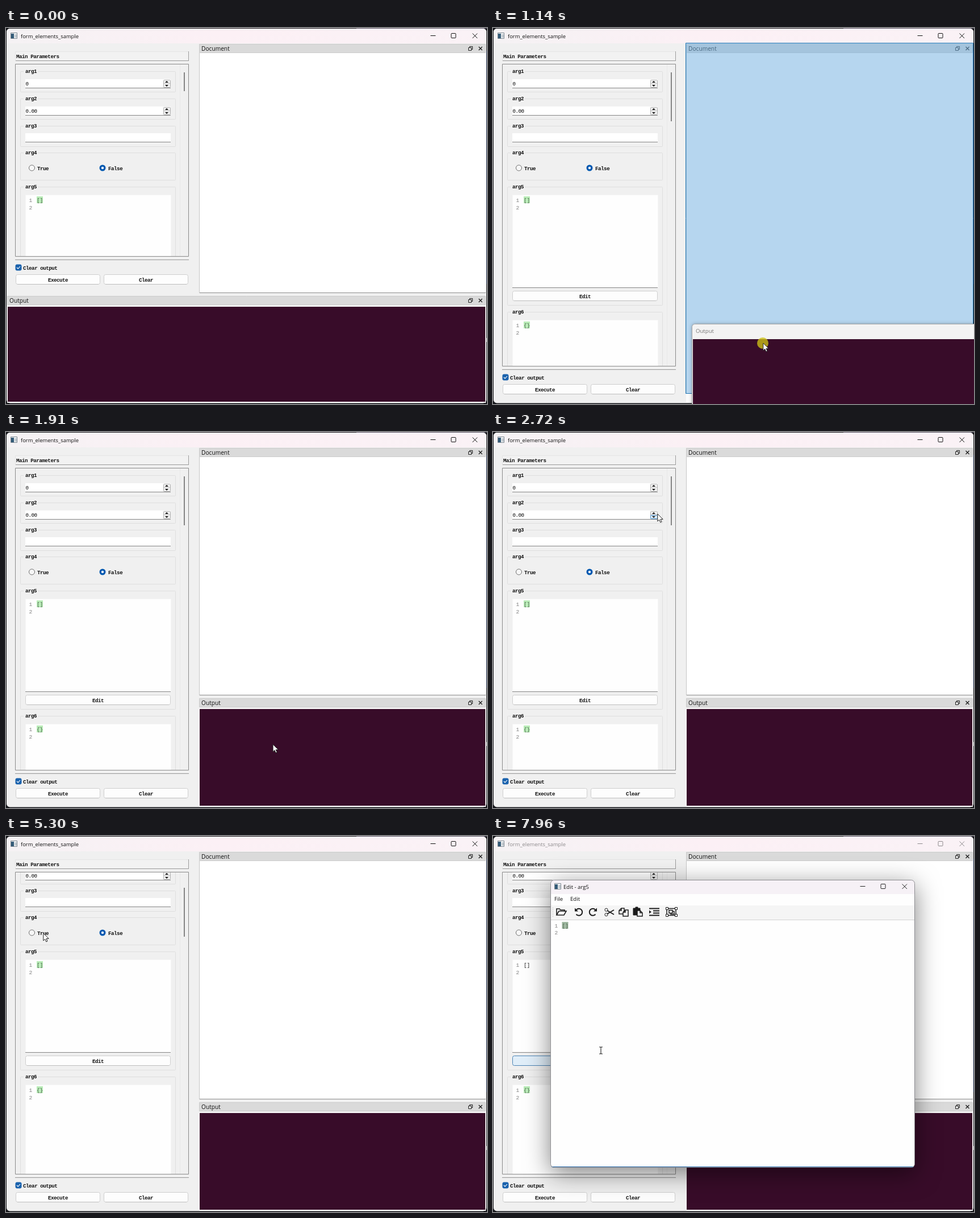
Write an HTML page with a canvas that moves like this. It is 847 px wide and 661 px high and loops after 8000 ms.

```html
<!DOCTYPE html>
<html lang="en">
<head>
<meta charset="utf-8">
<title>Form window</title>
<style>
html, body { margin: 0; height: 100%; overflow: hidden; background: #15161a; }
canvas { display: block; }
</style>
</head>
<body>
<canvas id="stage" width="847" height="661"></canvas>
<script>
const c = document.getElementById('stage').getContext('2d');
const UI = '"Open Sans", "Noto Sans", sans-serif';
const MONO = '"Liberation Mono", "DejaVu Sans Mono", monospace';
const GREY = '#f0f0f0', DARK = '#380c29', LINE = '#8a8a8a', BLUE = '#1a62ad', FOCUS = '#0067c0';
const MARK = '#b9ecb7';
const LOOP = 8000;

// Pointer stops: time, x, y
const path = [
  [70, -8, 560], [360, 127, 480], [480, 127, 480], [860, 335, 492], [1140, 475, 554],
  [1420, 495, 583], [1630, 484, 581], [1790, 484, 581], [2520, 283, 147], [2590, 283, 147],
  [2720, 289, 144], [2780, 289, 144], [2930, 313, 135], [3140, 313, 135], [3380, 301, 118],
  [3610, 313, 93], [3850, 313, 93], [4150, 313, 106], [4450, 313, 106], [5230, 66, 168],
  [5300, 65, 171], [5600, 65, 171], [6100, 62, 231], [6620, 62, 231], [6790, 87, 376],
  [6850, 87, 376], [7210, 165, 394], [7410, 165, 394], [7900, 190, 377]
];

const clamp = v => Math.max(0, Math.min(1, v));
const ease = (t, a, b) => { const p = clamp((t - a) / (b - a)); return p * p * (3 - 2 * p); };
const mix = (a, b, p) => a + (b - a) * p;
const within = (t, a, b) => t >= a && t < b;

function pointer(t) {
  let i = path.findIndex(k => k[0] > t);
  if (i < 0) i = path.length - 1;
  if (i === 0) return null;
  const a = path[i - 1], b = path[i], p = ease(t, a[0], b[0]);
  return { x: mix(a[1], b[1], p), y: mix(a[2], b[2], p) };
}

function fill(x, y, w, h, color) { c.fillStyle = color; c.fillRect(x, y, w, h); }

function box(x, y, w, h, color, edge, r = 0) {
  c.beginPath();
  c.roundRect(x + .5, y + .5, w - 1, h - 1, r);
  if (color) { c.fillStyle = color; c.fill(); }
  if (edge) { c.strokeStyle = edge; c.lineWidth = 1; c.stroke(); }
}

function text(s, x, y, color = '#111', font = '9.6px ' + UI, gap = 0, align = 'left') {
  c.font = font;
  c.letterSpacing = gap + 'px';
  c.textAlign = align;
  c.fillStyle = color;
  c.fillText(s, x, y);
}
const label = (s, x, y, align) => text(s, x, y, '#111', 'bold 9.2px ' + MONO, -.48, align);
const code = (s, x, y, color) => text(s, x, y, color, '9.6px ' + MONO, -.3);

// Strokes and optionally fills an SVG path at a place
function draw(d, x, y, color, width = 1, inner) {
  const p = new Path2D(d);
  c.save();
  c.translate(x, y);
  if (inner) { c.fillStyle = inner; c.fill(p); }
  if (width) { c.strokeStyle = color; c.lineWidth = width; c.stroke(p); }
  c.restore();
}

function circle(x, y, r, color, edge) {
  c.beginPath();
  c.arc(x, y, r, 0, 7);
  if (color) { c.fillStyle = color; c.fill(); }
  if (edge) { c.strokeStyle = edge; c.lineWidth = 1; c.stroke(); }
}

function shadowBox(x, y, w, h, r, color, shade, blur, drop) {
  c.save();
  c.shadowColor = shade;
  c.shadowBlur = blur;
  c.shadowOffsetY = drop;
  box(x, y, w, h, color, null, r);
  c.restore();
}

function appIcon(x, y) {
  box(x, y, 12, 11, '#f4f6f8', '#7d8790');
  fill(x + 1, y + 2, 5, 8, '#345b78');
  fill(x + 7, y + 3, 4, 6, '#c5ccd2');
}

function windowButtons(x, y, color) {
  draw('M0 .5h9', x, y - 1, color);
  box(x + 36, y - 5, 9, 9, null, color, 1);
  draw('M0 0l8.5 8.5M8.5 0L0 8.5', x + 74, y - 4.5, color);
}

function dockTitle(name, x, y, w) {
  box(x, y, w, 16, '#dadada', '#cbcbcb');
  text(name, x + 4, y + 12, '#111', '10.2px ' + UI);
  draw('M2.5 2.5v-2h5v5h-2M.5 2.5h5v5h-5z', 814, y + 4, '#222');
  draw('M0 0l6 6M6 0L0 6', 832.5, y + 5, '#222', 1.4);
}

function dockDark(x, y) {
  dockTitle('Output', x, y, 845 - x);
  fill(x, y + 18, 845 - x, 659 - y - 18, '#fbfbfb');
  fill(x + 1, y + 19, 843 - x, 657 - y - 19, DARK);
}

function dropZone(x, y, w, h) {
  box(x, y, w, h, 'rgba(118,178,224,.53)', '#2277b5');
}

function button(name, x, y, w, hot) {
  box(x, y, w, 18, hot ? '#e0eef9' : '#fdfdfd', hot ? '#4b83b4' : '#cecece', 3);
  if (!hot) fill(x + 3, y + 17, w - 6, 1, '#bdbdbd');
  label(name, x + w / 2, y + 12.5, 'center');
}

function group(name, y, h) {
  box(25, y, 274, h, null, '#dedede', 1);
  fill(31, y - 1, 25, 3, GREY);
  label(name, 34, y + 3.3);
}

function field(y, value) {
  fill(34, y, 256, 16, '#fff');
  fill(34, y + 15, 256, 1, '#868686');
  text(value, 34.5, y + 11, '#000', '9.2px ' + MONO, -.5);
}

function spin(y, value, hot) {
  field(y, value);
  box(277, y + 1, 13, 14, GREY, '#b0b0b0', 1);
  if (hot) box(277, y + 8, 13, 7, '#dcecf9', '#4b93cf', 1);
  fill(278, y + 7, 11, 1, '#c4c4c4');
  draw('M0 3l3-3 3 3z', 280, y + 3, '', 0, '#111');
  draw('M0 0h6l-3 3z', 280, y + 10, '', 0, '#111');
}

function brackets(s, x, y, mark) {
  if (mark) fill(x, y - 10, 11, 12, mark);
  code(s, x, y, mark ? '#47604a' : '#222');
}

function editor(y, value, mark, focus, caret) {
  box(34, y, 257, 164, '#fefefe', '#f5f5f5');
  code('1', 40.5, y + 13, '#808080');
  code('2', 40.5, y + 25.5, '#808080');
  brackets(value, 54, y + 13, mark);
  if (focus) fill(33, y + 162.5, 258, 1.5, FOCUS);
  else fill(34, y + 163, 256, 1, '#868686');
  if (caret) fill(59, y + 4, 1.2, 11, '#000');
}

function scrollBar(t, top, bottom, offset) {
  const hot = within(t, 2860, 3290) || within(t, 3520, 4600);
  const y = 78 + offset * 13 / 76, h = bottom > 500 ? 86 : 33;
  fill(306, top + 1, 1, bottom - top - 2, '#e8e8e8');
  if (hot) {
    box(307, 66, 13, bottom - 68, '#f8f8f8', '#ececec', 5);
    box(310, y, 6, h, '#858585', null, 3);
    draw('M0 4l3-4 3 4z', 310, 70, '', 0, '#858585');
    draw('M0 0h6l-3 4z', 310, bottom - 10, '', 0, '#858585');
  } else fill(313, y, 2, h, '#858585');
}

function form(t) {
  const grow = 193 * ease(t, 930, 1060), bottom = 402 + grow;
  const scroll = 76 * ease(t, 3850, 4150);
  const focus = within(t, 5900, 7450);
  const caret = focus && Math.floor((t - 6510) / 530) % 2 === 0;

  box(16, 41, 306, 17, '#f2f2f2', '#e4e4e4');
  fill(17, 57, 305, 1, '#9b9b9b');
  fill(321, 41, 1, 17, '#9b9b9b');
  label('Main Parameters', 18, 52.7);

  c.save();
  c.beginPath();
  c.rect(17, 64, 304, bottom - 65);
  c.clip();
  c.translate(0, -Math.round(scroll));
  group('arg1', 76, 37);
  spin(90, '0');
  group('arg2', 124, 37);
  spin(138, '0.00', within(t, 2450, 2860));
  group('arg3', 172, 37);
  field(185, '');
  group('arg4', 219, 49);
  circle(45.5, 246, 5, '#f7f7f7', '#6d6d6d');
  label('True', 55, 249.5);
  circle(170, 246, 5.5, '#0058b0');
  circle(170, 246, 2.2, '#fff');
  label('False', 180, 249.5);
  group('arg5', 279, 209);
  editor(293, '[]', t < 5900 && MARK, focus, caret);
  button('Edit', 34, 462, 256, t > 7020);
  group('arg6', 499, 209);
  editor(513, '{}', MARK);
  c.restore();

  scrollBar(t, 63, bottom, scroll);
  box(16, 63, 306, bottom - 63, null, LINE);

  c.save();
  c.translate(0, Math.round(grow));
  fill(16, 407, 306, 1, '#969696');
  box(16.5, 415.5, 11, 11, BLUE, BLUE, 2);
  draw('M0 2.5L2.2 4.7 6 .5', 19, 418.5, '#fff', 1.1);
  label('Clear output', 30, 424.5);
  button('Execute', 17, 433, 149);
  button('Clear', 172, 433, 149);
  c.restore();
}

function floatingOutput(x, y) {
  shadowBox(x, y, 846, 197, 5, '#f3f3f3', 'rgba(0,0,0,.3)', 6, 0);
  box(x, y, 846, 197, null, '#a5a5a5', 5);
  text('Output', x + 7, y + 16, '#777');
  draw('M0 0l8 8M8 0L0 8', x + 822, y + 9, '#888');
  fill(x + 2, y + 27, 843, 168, DARK);
}

function docks(t, p) {
  const merged = within(t, 930, 1280);
  const bottom = t < 930 ? 466 : merged ? 643 : t < 1790 ? 467 : 463;
  dockTitle('Document', 340, 28, 505);
  fill(340, 44, 505, bottom - 44, '#fff');
  fill(340, bottom - 1, 505, 1, LINE);
  fill(340, 44, 1, bottom - 44, '#c6c6c6');

  if (t < 440) dockDark(2, 471);
  else if (t >= 1850) dockDark(340, 468);
  else if (t < 930) dropZone(2, 470, 844, 189);
  else if (merged) {
    fill(340, 643, 60, 15, '#fbfbfb');
    dropZone(339, 26, 507, 617);
  } else dropZone(339, 470, 507, 190);

  if (within(t, 440, 1850)) {
    const drop = ease(t, 1760, 1850);
    floatingOutput(Math.round(mix(p.x - 125, 340, drop)), Math.round(mix(p.y - 34, 468, drop)));
  }
}

function toolbar() {
  const ink = '#1c1c1c', paper = '#f5f5f5';
  const turn = (x, flip) => {
    c.save();
    c.translate(x, 133.5);
    c.scale(flip, 1);
    draw('M-4.5-3.5A6 6 0 1 1-4.5 4', 0, 0, ink, 2);
    draw('M-7-7v6h6z', 0, 0, '', 0, ink);
    c.restore();
  };
  for (let y = 126; y < 143; y += 3) fill(105, y, 1, 1, '#aaa');
  draw('M-8 5v-11h5l2 2h7v3M-8 5l4-7h13l-4 7z', 120, 134, ink, 1.6);
  turn(151, 1);
  turn(176, -1);
  draw('M-3-3L9 4M-3 3L9-4', 204, 134, ink, 1.8);
  circle(199.5, 129.8, 2.6, null, ink);
  circle(199.5, 138.2, 2.6, null, ink);
  draw('M-8 4v-6l4-4h5v10zM-8-2h4v-4', 230, 133, ink, 1.5, paper);
  draw('M-1 7v-7l4-4h5v11zM-1 0h4v-4', 230, 134, ink, 1.5, paper);
  draw('M-8-6h4v-2h4v2h4v12h-12z', 255, 133, ink, 1, ink);
  draw('M-1-2h5l4 4v6h-9zM4-2v4h4', 255, 133, ink, 1.5, paper);
  draw('M-9-6h18M-2-2H9M-2 2H9M-9 6h18', 284, 133.5, ink, 2);
  draw('M-9-3l4 3-4 3z', 284, 133.5, '', 0, ink);
  draw('M-8-6h16v12h-16zM-4-3h6v5h-6zM2-1h3v5h-6v-2', 314, 133.5, ink, 1.5);
  for (const x of [304, 320]) for (const y of [125, 137]) box(x, y, 5, 5, paper, ink);
}

function dialog(t) {
  const p = ease(t, 7550, 7760);
  if (!p) return;
  c.save();
  c.globalAlpha = p;
  const s = mix(.9, 1, p);
  c.translate(422, 330);
  c.scale(s, s);
  c.translate(-422, -330);
  shadowBox(101, 77, 642, 506, 6, '#fefefe', 'rgba(0,0,0,.5)', 44, 10);
  c.save();
  c.beginPath();
  c.roundRect(101, 77, 642, 506, 6);
  c.clip();
  fill(101, 77, 642, 25, '#f6f1f6');
  fill(101, 122, 642, 25, '#f5f5f5');
  fill(101, 147, 642, 1, '#d2d2d2');
  fill(101, 581, 642, 2, '#2f6fae');
  c.restore();
  box(101, 77, 642, 506, null, '#8e8e92', 6);
  appIcon(108, 83);
  text('Edit - arg5', 124, 92.5);
  windowButtons(646.5, 89, '#222');
  text('File', 108, 114);
  text('Edit', 136, 114);
  toolbar();
  code('1', 108.5, 161, '#808080');
  code('2', 108.5, 173, '#808080');
  brackets('[]', 121.5, 161, '#9fb8a0');
  c.restore();
}

function drawPointer(t, p) {
  const scroll = 76 * ease(t, 3850, 4150), y = p.y + scroll;
  if (within(t, 400, 1760) || within(t, 3800, 4200)) circle(p.x, p.y, 10, 'rgba(205,194,22,.78)');
  const overText = p.x > 34 && p.x < 290 && (within(y, 293, 457) || y > 513) && t > 1790;
  if (overText || t > 7650) {
    draw('M-3-6h2.2l.8.8.8-.8H3M0-5.5v11M-3 6h2.2l.8-.8.8.8H3', p.x, p.y, '#222', 1.1);
  } else {
    draw('M0 0v13l3-2.8 2 4.7 2.2-1-2-4.5h4.2z', p.x + .8, p.y, '#222', 1, '#fff');
  }
}

function frame(now) {
  const t = now % LOOP, p = pointer(t);
  const ink = within(t, 480, 1000) || t > 7550 ? '#8d8a8c' : '#111';
  fill(0, 0, 847, 661, '#15161a');
  fill(617, 0, 230, 1, '#5a5565');
  fill(846, 40, 1, 410, '#10203f');
  fill(845, 545, 2, 7, '#8b8b8b');
  c.save();
  c.beginPath();
  c.roundRect(1, 1, 845, 658.5, 6);
  c.clip();
  fill(0, 0, 847, 661, GREY);
  const bar = c.createLinearGradient(0, 0, 847, 0);
  bar.addColorStop(0, '#f5f2f4');
  bar.addColorStop(.45, '#fcf0f5');
  bar.addColorStop(1, '#faf2f6');
  fill(0, 0, 847, 27, bar);
  c.restore();
  appIcon(8, 8);
  text('form_elements_sample', 26, 17.5, ink, '9.4px ' + UI);
  windowButtons(747.5, 14, ink);
  form(t);
  docks(t, p);
  dialog(t);
  if (p) drawPointer(t, p);
  requestAnimationFrame(() => frame(performance.now() - start));
}

const start = performance.now();
frame(0);
</script>
</body>
</html>
```
